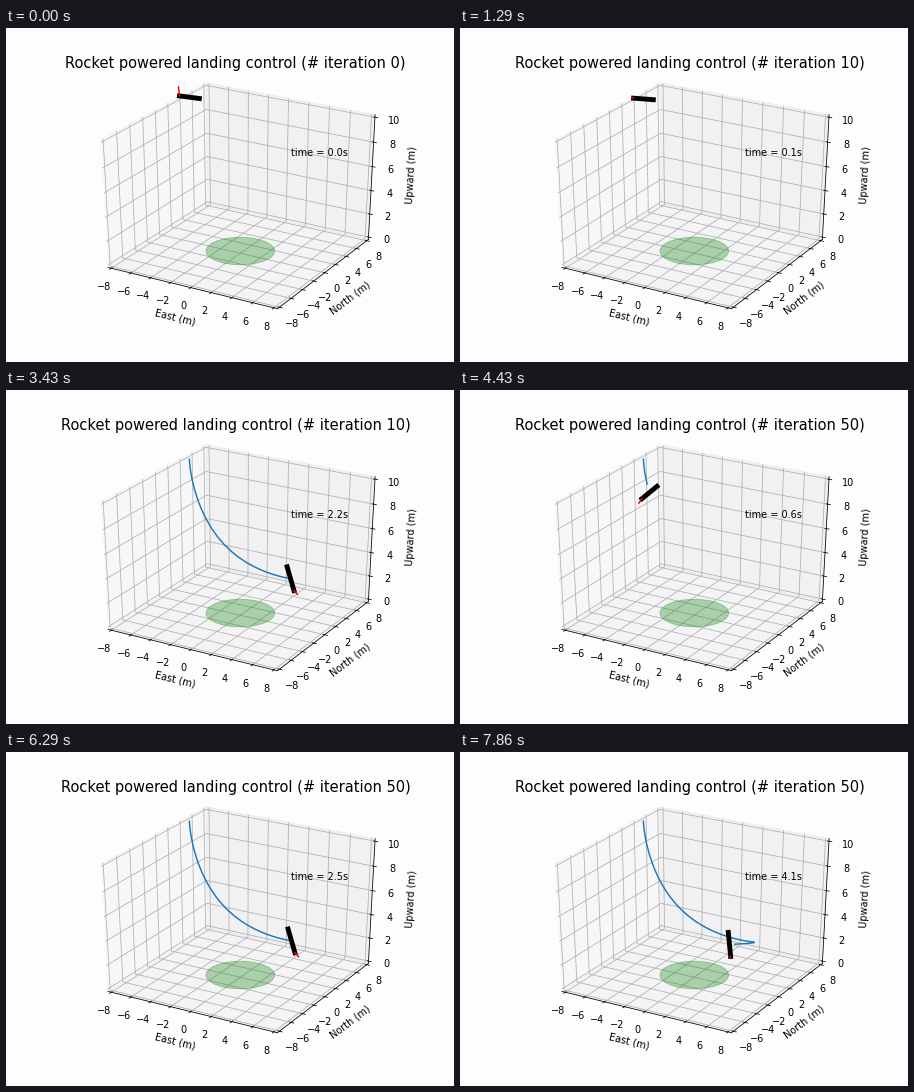
A matplotlib script for the animation above (8 s loop, 448 px wide and 334 px high).

```python
import matplotlib.pyplot as plt
import numpy as np
from matplotlib.animation import FuncAnimation
from matplotlib.patches import Circle
from mpl_toolkits.mplot3d import art3d

W, H, DPI = 448, 334, 70
LOOP_MS, TICK_MS = 8000, 50
POSES = 56                  # pictures per loop, each held for several ticks
DT, RATE = 0.1, 0.1445      # simulation step, simulated seconds per picture
START = np.array([183.4, 69.2])

plt.rcParams["font.family"] = "DejaVu Sans"


def ease(t, rate, power):
    """Slow start, then a soft approach to 1."""
    return 1 - np.exp(-rate * t ** power)


def fall(t):
    """Uncontrolled flight: stage x, y, pitch from upright, flame x, y."""
    return (START[0] + 22 * t ** 2, START[1] + 84 * t ** 2,
            1.5 - 1.6 * t ** 2, -1 - 2 * t, -9 + 14 * t)


def glide(t):
    """Controlled flight: dive, level off, then turn back to the pad."""
    back = np.maximum(t - 3.2, 0)
    x = START[0] + 112 * ease(t, 0.214, 2.65) - 32 * back ** 2
    y = START[1] + 121 * ease(t, 0.83, 1.85) + 2.5 * back
    pitch = 1.5 - 1.87 * ease(t, 1, 1.7) + 0.28 * back
    knots = [0, 0.6, 1.35, 1.8, 3.3, 4.1]
    flame_x = np.interp(t, knots, [-1, -3, -1, 1, 6.5, -0.5])
    flame_y = np.interp(t, knots, [-2, 4.5, 6.5, 1.8, 6.3, 1.2])
    return x, y, pitch, flame_x, flame_y


# iteration, first picture, its simulated time, motion, pace
FLIGHTS = [(0, 0, 0.03, fall, 1),
           (10, 9, 0.12, glide, 1.12),
           (50, 27, 0.07, glide, 1)]

fig = plt.figure(figsize=(W / DPI, (H + 0.01) / DPI), dpi=DPI,
                 facecolor="#fdfcff")

# The 3D box fills its whole rectangle instead of a centred square.
ax = fig.add_axes([0.125, 37.4 / H, 0.775, 258.72 / H], projection="3d")
ax.apply_aspect = lambda position=None: None
ax.set_box_aspect((1, 1, 1), zoom=0.94676)
ax.view_init(elev=30, azim=-60)
ax.set_facecolor("none")
ax.set(xlim=(-25 / 3, 25 / 3), ylim=(-25 / 3, 25 / 3),
       zlim=(-5 / 24, 10 + 5 / 24),
       xticks=range(-8, 9, 2), yticks=range(-8, 9, 2), zticks=range(0, 11, 2),
       xlabel="East (m)", ylabel="North (m)", zlabel="Upward (m)")
pad = Circle((0, 0), 3, color="g", alpha=0.3)
ax.add_patch(pad)
art3d.pathpatch_2d_to_3d(pad, z=0, zdir="z")

title = ax.text2D(0.5, 0.993, "", transform=ax.transAxes, ha="center",
                  fontsize=15)
clock = ax.text2D(0.66, 0.65, "", transform=ax.transAxes)

# Flat layer in stage pixels for everything that flies.
stage = fig.add_axes([0, 0, 1, 1])
stage.set(xlim=(0, W), ylim=(H, 0))
stage.axis("off")
trail, = stage.plot([], [], color="C0", lw=1.5)
body, = stage.plot([], [], color="black", lw=5)
fire, = stage.plot([], [], color="red", lw=1.5)


def segment(line, a, b):
    line.set_data([a[0], b[0]], [a[1], b[1]])


def draw(tick):
    pose = int((tick + 0.9) * TICK_MS * POSES / LOOP_MS)
    iteration, first, offset, motion, pace = [
        f for f in FLIGHTS if f[1] <= pose][-1]
    step = int(((pose - first) * RATE + offset) / DT)
    t = step * DT

    trail.set_data(*motion(np.arange(step) * DT * pace)[:2])

    x, y, pitch, flame_x, flame_y = motion(t * pace)
    mid, flame = np.array([x, y]), np.array([flame_x, flame_y])
    half = np.array([9.95 * np.sin(pitch),
                     2.14 * np.sin(pitch) - 11.87 * np.cos(pitch)])
    tail = mid - half
    segment(body, tail, mid + half)
    segment(fire, tail, tail + flame)

    title.set_text(f"Rocket powered landing control (# iteration {iteration})")
    clock.set_text(f"time = {t:.1f}s")
    return trail, body, fire, title, clock


anim = FuncAnimation(fig, draw, frames=LOOP_MS // TICK_MS, interval=TICK_MS,
                     init_func=lambda: draw(0), repeat=True, repeat_delay=0)
plt.show()
```
